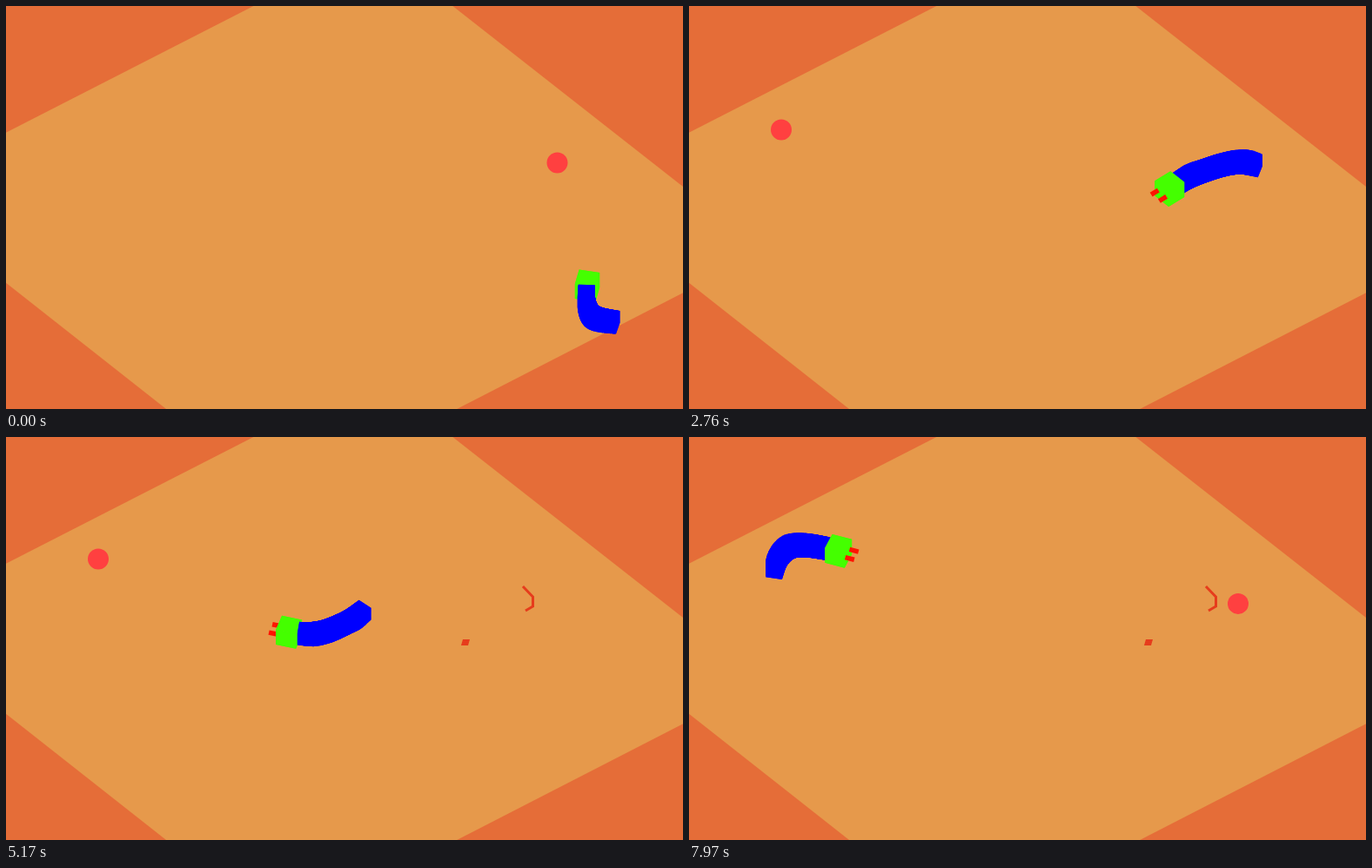
An HTML page with a canvas for the animation above (8 s loop, 778x464 px).

```html
<!DOCTYPE html>
<html lang="en">
<head>
<meta charset="utf-8">
<title>Snake</title>
<style>
  html, body { margin: 0; width: 100%; height: 100%; overflow: hidden; background: #e56d38; }
  canvas { display: block; }
</style>
</head>
<body>
<canvas id="stage" width="778" height="464"></canvas>
<script>
const ctx = document.getElementById('stage').getContext('2d');
const LOOP = 8000;
const TILT = 0.7;                       // vertical foreshortening of the ground
const STEP = 500, ROUTE_START = -1000;  // waypoint spacing and first time, ms
const BODY_START = 165, BODY_END = 855; // how far, in ms, the body trails the head
const BOB_PERIOD = 1550, BOB_HEIGHT = 3;

// Where the snake turns: one waypoint per STEP
const route = [
  [701, 364], [672, 355], [668, 322], [686, 280], [706, 237],
  [679, 205], [638, 180], [578, 195], [530, 221], [483, 204],
  [432, 189], [391, 214], [346, 227], [280, 215], [213, 202],
  [150, 184], [101, 157], [118, 126], [175, 132], [225, 150]
];

const apples = [
  { until: 1920, x: 633.5, y: 177.5 },
  { until: 6920, x: 106, y: 142 },
  { until: LOOP, x: 631, y: 190 }
];

const board = [[-133, 214], [423, -71], [872, 282], [316, 568]];

// Catmull-Rom curve through the waypoints
function locate(t) {
  const pos = (t - ROUTE_START) / STEP;
  const i = Math.floor(pos), u = pos - i;
  const point = j => route[Math.min(Math.max(j, 0), route.length - 1)];
  const [a, b, c, d] = [-1, 0, 1, 2].map(k => point(i + k));
  return [0, 1].map(n => b[n] + 0.5 * u * (c[n] - a[n]
    + u * (2 * a[n] - 5 * b[n] + 4 * c[n] - d[n]
    + u * (3 * (b[n] - c[n]) + d[n] - a[n]))));
}

// The snake faces where it is about to go
function pose(t) {
  const [x, y] = locate(t);
  const [nextX, nextY] = locate(t + 120);
  return { x, y, angle: Math.atan2((nextY - y) / TILT, nextX - x) };
}

// Ground position relative to a pose: ahead, sideways, raised
function project(p, ahead, side, up = 0) {
  const c = Math.cos(p.angle), s = Math.sin(p.angle);
  return [p.x + ahead * c - side * s, p.y + TILT * (ahead * s + side * c) - up];
}

function polygon(points, color) {
  ctx.fillStyle = color;
  ctx.beginPath();
  points.forEach(([x, y]) => ctx.lineTo(x, y));
  ctx.fill();
}

function cube(p, size, color) {
  const half = size / 2, rise = half * Math.sqrt(1 - TILT * TILT);
  const corners = [[1, 1], [1, -1], [-1, -1], [-1, 1]];
  const face = up => corners.map(([a, s]) => project(p, a * half, s * half, up));
  const base = face(-rise), top = face(rise);
  polygon(base, color);
  for (let i = 0; i < 4; i++) {
    const j = (i + 1) % 4;
    polygon([base[i], base[j], top[j], top[i]], color);
  }
  polygon(top, color);
}

function drawBody(t) {
  for (let lag = BODY_END; lag >= BODY_START; lag -= 15) cube(pose(t - lag), 19, '#00f');
}

function drawTongue(p) {
  ctx.strokeStyle = '#ff1400';
  ctx.lineWidth = 5.5;
  for (const side of [-7, 7]) {
    ctx.beginPath();
    ctx.moveTo(...project(p, 11, side));
    ctx.lineTo(...project(p, 22, side));
    ctx.stroke();
  }
}

function drawSnake(t) {
  const head = pose(t);
  const parts = [
    () => drawTongue(head),
    () => cube(head, 24, '#4f0'),
    () => drawBody(t)
  ];
  // Whatever is nearer to the viewer is drawn last
  if (Math.sin(head.angle) > 0) parts.reverse();
  parts.forEach(draw => draw());
}

function drawApple(t) {
  const { x, y } = apples.find(apple => t < apple.until);
  const bob = BOB_HEIGHT * Math.cos(2 * Math.PI * t / BOB_PERIOD);
  ctx.fillStyle = '#ff4040';
  ctx.beginPath();
  ctx.arc(x, y + bob, 12, 0, 2 * Math.PI);
  ctx.fill();
}

// Red scraps left behind on the board
function drawScraps(t) {
  const color = '#e63c1c';
  if (t > 3020) polygon([[525, 233], [533, 233], [531, 240], [523, 240]], color);
  if (t > 3260) {
    ctx.strokeStyle = color;
    ctx.lineWidth = 3;
    ctx.stroke(new Path2D('M594 172L605.5 184V195L597 200'));
  }
}

function render(t) {
  polygon([[0, 0], [778, 0], [778, 464], [0, 464]], '#e56d38');
  polygon(board, '#e6994b');
  drawScraps(t);
  drawApple(t);
  drawSnake(t);
}

let start;
function tick(now) {
  start ??= now;
  render((now - start) % LOOP);
  requestAnimationFrame(tick);
}
render(0);
requestAnimationFrame(tick);
</script>
</body>
</html>
```
